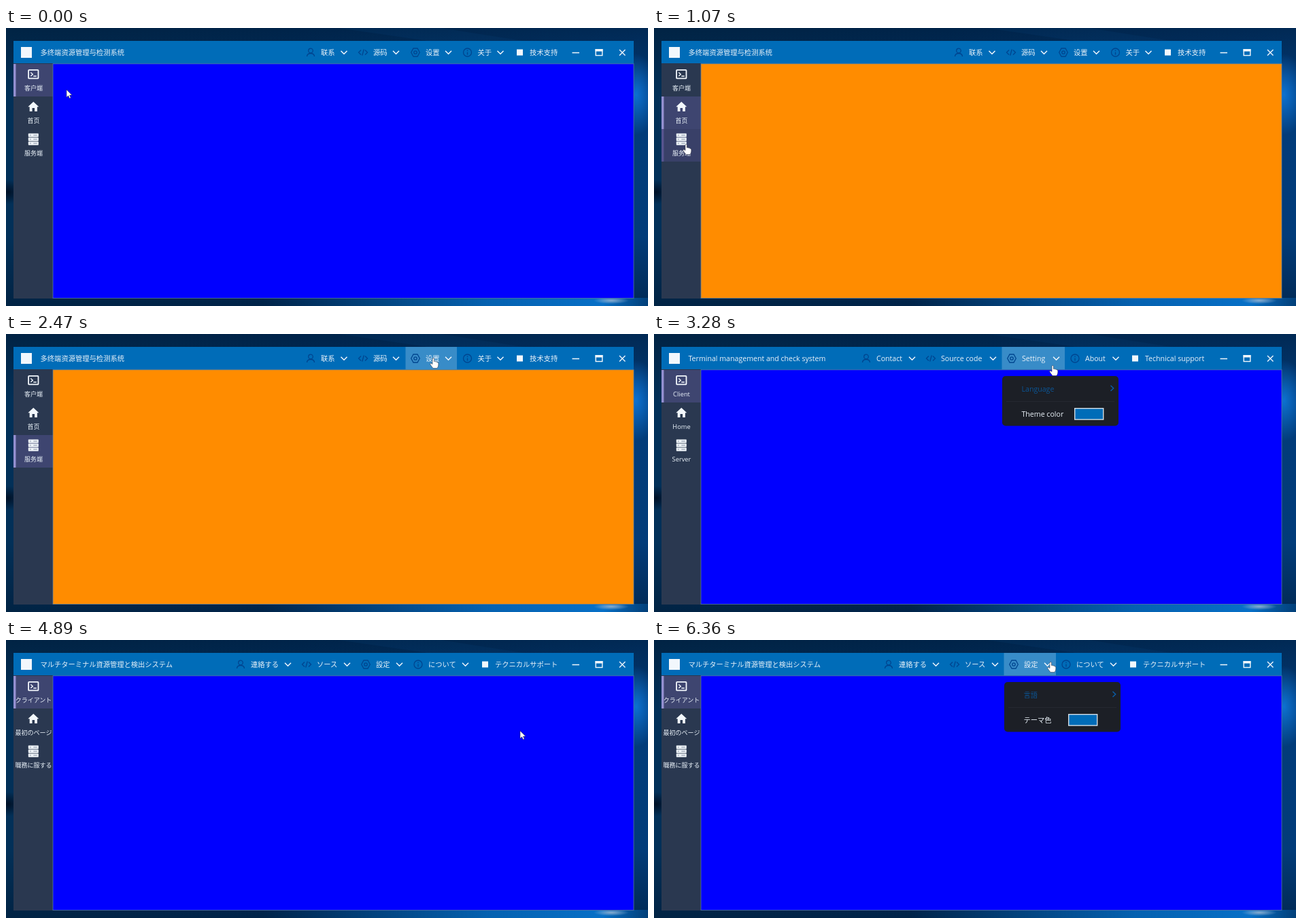
Recreate the animation shown at these times as an HTML page. Size 944 px wide and 410 px high, loop 6.49 s.

```html
<!DOCTYPE html>
<html lang="en">
<head>
<meta charset="utf-8">
<title>Desktop menu demo</title>
<style>
html, body { margin: 0; width: 100%; height: 100%; overflow: hidden; background: #02284f; }
svg { display: block; width: 944px; height: 410px; }
.zh { font-family: "Noto Sans CJK SC", "Noto Sans CJK", sans-serif; --size: 10.3px; }
.ja { font-family: "Noto Sans CJK JP", "Noto Sans CJK", sans-serif; --size: 10.25px; }
.en { font-family: "Open Sans", "Noto Sans", sans-serif; --size: 10.6px; }
text { font-size: var(--size); font-weight: 500; fill: #eaf2f9; white-space: pre; }
.side { font-size: 9px; text-anchor: middle; }
.en .side { font-size: 9.3px; }
.dim { fill: #0b5595; }
.line { fill: none; stroke: #f2f7fc; stroke-width: 1.4; }
.dark { fill: none; stroke: #00458f; stroke-width: 1.3; }
</style>
</head>
<body>
<svg viewBox="0 0 944 410">
  <defs>
    <linearGradient id="sky">
      <stop offset="0" stop-color="#023058"/>
      <stop offset=".45" stop-color="#003062"/>
      <stop offset="1" stop-color="#023c7a"/>
    </linearGradient>
    <linearGradient id="shade" x2="0" y2="1">
      <stop offset="0" stop-color="#001730" stop-opacity=".5"/>
      <stop offset=".25" stop-color="#001730" stop-opacity="0"/>
      <stop offset=".75" stop-color="#001730" stop-opacity="0"/>
      <stop offset="1" stop-color="#001730" stop-opacity=".5"/>
    </linearGradient>
    <linearGradient id="floor">
      <stop offset=".4" stop-color="#0670c8" stop-opacity="0"/>
      <stop offset=".75" stop-color="#0670c8" stop-opacity=".8"/>
      <stop offset=".93" stop-color="#0878d4" stop-opacity=".9"/>
      <stop offset="1" stop-color="#0670c8" stop-opacity=".3"/>
    </linearGradient>
    <radialGradient id="glow">
      <stop offset="0" stop-color="#0f7be0" stop-opacity=".85"/>
      <stop offset="1" stop-color="#0f7be0" stop-opacity="0"/>
    </radialGradient>
    <radialGradient id="night">
      <stop offset="0" stop-color="#000d20" stop-opacity=".9"/>
      <stop offset="1" stop-color="#000d20" stop-opacity="0"/>
    </radialGradient>
    <radialGradient id="mist">
      <stop offset="0" stop-color="#a9bfd6" stop-opacity=".8"/>
      <stop offset="1" stop-color="#a9bfd6" stop-opacity="0"/>
    </radialGradient>
  </defs>
  <rect width="944" height="410" fill="url(#sky)"/>
  <path d="M490 0 640 0 760 19H620Z" fill="#0a58a4" opacity=".25"/>
  <rect width="944" height="410" fill="url(#shade)"/>
  <rect y="398" width="944" height="12" fill="url(#floor)"/>
  <ellipse cx="926" cy="98" rx="34" ry="60" fill="url(#glow)"/>
  <ellipse cx="3" cy="242" rx="22" ry="18" fill="url(#night)"/>
  <ellipse cx="890" cy="402" rx="26" ry="5" fill="url(#mist)"/>
  <g id="app"></g>
</svg>
<script>
const LOOP = 6490, THEME = '#006cb8';
const PAGES = ['#00f', '#f00', '#ff8c00'];
const LANGUAGES = ['中文', 'English', '日本語'];

// x: menu text positions, chev: chevron centres
const PACKS = {
  zh: {
    title: '多终端资源管理与检测系统', side: ['客户端', '首页', '服务端'],
    menu: ['联系', '源码', '设置', '关于'], x: [463, 540, 617, 693.5], chev: [497, 573.5, 650.5, 727],
    help: '技术支持', helpX: 770, lang: '语言', color: '主题颜色', swatch: 94
  },
  en: {
    title: 'Terminal management and check system', side: ['Client', 'Home', 'Server'],
    menu: ['Contact', 'Source code', 'Setting', 'About'], x: [327, 422, 541, 634], chev: [379.5, 498.5, 591.5, 679],
    help: 'Technical support', helpX: 722, lang: 'Language', color: 'Theme color', swatch: 106
  },
  ja: {
    title: 'マルチターミナル資源管理と検出システム', side: ['クライアント', '最初のページ', '職務に服する'],
    menu: ['連絡する', 'ソース', '設定', 'について'], x: [360, 457, 544, 621], chev: [414.5, 501.5, 578.5, 675.5],
    help: 'テクニカルサポート', helpX: 719, lang: '言語', color: 'テーマ色', swatch: 94
  }
};

// each step changes only the listed properties
const STEPS = [
  [0, { lang: 'zh', page: 0, active: 0, over: -1, x: 89, y: 91, hand: 0, ripple: 0, hot: 0, menu: 0, sub: 0, pick: -1 }],
  [270, { x: 60, y: 112, hand: 1, over: 1 }],
  [470, { x: 45, y: 131 }],
  [670, { page: 1, ripple: 1 }],
  [870, { active: 1, over: -1, ripple: 0, x: 46, y: 142 }],
  [1070, { page: 2, over: 2, x: 47, y: 172 }],
  [1270, { active: 2, over: -1 }],
  [1470, { x: 100, y: 190, hand: 0 }],
  [1670, { x: 240, y: 222 }],
  [1870, { x: 400, y: 252 }],
  [2070, { x: 524, y: 265 }],
  [2270, { x: -50 }],
  [2470, { x: 628, y: 36, hand: 1, hot: 1 }],
  [2670, { x: 630, y: 76, menu: 1 }],
  [2870, { x: 790, y: 112, sub: 1, pick: 1 }],
  [3080, { lang: 'en', page: 0, active: 0, hot: 0, menu: 0, sub: 0, x: 660, y: 80, hand: 0 }],
  [3280, { x: 586, y: 47, hand: 1, hot: 1, menu: 1 }],
  [3490, { x: 600, y: 76 }],
  [3690, { x: 655, y: 78, sub: 1, pick: -1 }],
  [3890, { x: 710, y: 84, pick: 0 }],
  [4090, { x: 745, y: 110, pick: 1 }],
  [4290, { x: 756, y: 140, pick: 2 }],
  [4690, { lang: 'ja', hot: 0, menu: 0, sub: 0, y: 134, hand: 0 }],
  [5290, { x: 738, y: 122 }],
  [5490, { x: 704, y: 104 }],
  [5690, { x: 666, y: 86 }],
  [5890, { x: 630, y: 70 }],
  [6090, { x: 600, y: 58 }],
  [6360, { x: 583, y: 33, hand: 1, hot: 1, menu: 1 }]
];

const rect = (x, y, w, h, fill, more = '') =>
  `<rect x="${x}" y="${y}" width="${w}" height="${h}" fill="${fill}" ${more}/>`;
const text = (x, y, s, cls = '') => `<text x="${x}" y="${y}" class="${cls}">${s}</text>`;
const path = (d, cls, more = '') => `<path d="${d}" class="${cls}" ${more}/>`;
const at = (x, y, body) => `<g transform="translate(${x} ${y})">${body}</g>`;

const ICONS = [
  '<circle cy="-2.5" r="3.3" class="dark"/>' + path('M-5.5 6C-5 0 5 0 5.5 6', 'dark'),
  path('M-3-3.5-6.5 0-3 3.5M3-3.5 6.5 0 3 3.5M1.3-4.5-1.3 4.5', 'dark'),
  path('M-3-6H3L6.3 0 3 6H-3L-6.3 0Z', 'dark') + '<circle r="2.2" class="dark"/>',
  '<circle r="6" class="dark"/>' + path('M0-3.5V-2M0-.5V3.5', 'dark')
];
const SIDE_ICONS = [
  '<rect x="-7.2" y="-6.2" width="14.4" height="12.6" rx="1" class="line" style="stroke-width:1.8"/>' +
    path('M-4-2.5-1 .2-4 3M0 3H4.5', 'line'),
  path('M0-7.2 8 .2H5.6V7H1.8V2H-1.8V7H-5.6V.2H-8Z', '', 'fill="#f2f7fc"'),
  [-8.5, -2.5, 3.5].map(y => rect(-7.5, y, 15, 5.2, '#eef3f8', 'rx=".8"') +
    path(`M-5.5 ${y + 2.6}H-3.5M0 ${y + 2.6}H5.5`, '', 'stroke="#8793a5"')).join('')
];
const EDGE = 'fill="#fff" stroke="#223" stroke-width=".5"';
const ARROW = path('M0 0V11.2L2.6 8.8 4.3 12.8 6.2 12 4.5 8.1H8Z', '', EDGE);
const HAND = path('M-1 0Q.2-1.2 1.4 0V4.5Q3 3.8 3.6 5 5.2 4.4 5.8 5.7 7.6 5.4 7.8 7.2V10Q7.5 13 5.6 14.5H0Q-2.5 11.5-4.5 8.2-3.2 6.4-1 8.5Z', '', EDGE);

function sidebar(s, p) {
  let out = rect(11, 52, 58, 347, '#2a3850');
  p.side.forEach((label, i) => {
    const top = 53 + 48 * i, on = s.active === i;
    if (on || s.over === i) {
      out += rect(11, top, 58, 48, on ? '#3e4570' : '#394068');
      out += rect(11, top, 3.5, 48, on ? '#938fd0' : '#57548f');
    }
    out += at(40.3, top + 15, SIDE_ICONS[i]) + text(40.5, top + 38.5, label, 'side');
  });
  if (s.ripple) out += '<circle cx="45" cy="126" r="12" fill="#8c8fa8" opacity=".4"/>';
  return out;
}

function titleBar(s, p) {
  let out = rect(11, 19, 912, 34, THEME);
  if (s.hot) {
    const left = p.x[2] - 29.5;
    out += rect(left, 19, p.chev[2] + 12.5 - left, 33.5, '#fff', 'opacity=".22"');
  }
  out += rect(22, 28, 16, 16, '#f2f7fc') + text(50.5, 40.2, p.title);
  p.menu.forEach((label, i) => {
    out += at(p.x[i] - 15, 36, ICONS[i]) + text(p.x[i], 40.2, label);
    out += at(p.chev[i], 36, path('M-4.5-2.3 0 2.3 4.5-2.3', 'line'));
  });
  out += rect(p.helpX - 19, 31.5, 9, 9, '#f2f7fc') + text(p.helpX, 40.2, p.help);
  out += path('M832.5 36.5H843M902 32 910.5 40.5M910.5 32 902 40.5', 'line');
  out += '<rect x="867.2" y="31.7" width="9.6" height="8.8" class="line"/>' + rect(866.5, 31, 11, 3.5, '#f2f7fc');
  return out;
}

function popup(s, p) {
  const x = p.x[2] - 29;
  let out = rect(x, 62, 171, 73.5, '#1c1f26', 'rx="5"');
  out += rect(x + 6, 99, 159, .7, '#2a2d35');
  out += text(x + 28.5, 84.7, p.lang, 'dim');
  out += at(x + 161.5, 80, path('M-2-4 2.2 0-2 4', 'line', 'style="stroke:#0b5ea8"'));
  out += text(x + 28.5, 121.7, p.color);
  out += rect(x + p.swatch + .7, 109.7, 42, 16.4, THEME, 'stroke="#d5dce3" stroke-width="1.4"');
  if (!s.sub) return out;
  out += rect(x + 173, 62, 112, 111, '#1c1f26', 'rx="5"');
  LANGUAGES.forEach((name, i) => {
    out += text(x + 199, 84.7 + 37 * i, name, s.pick === i ? 'dim' : '');
  });
  return out;
}

function draw(s) {
  const p = PACKS[s.lang];
  return `<g class="${s.lang}">` + titleBar(s, p) + sidebar(s, p) +
    rect(69, 52.8, 854, 345.7, PAGES[s.page], 'stroke="#5b7f9e" stroke-opacity=".75"') +
    (s.menu ? popup(s, p) : '') + at(s.x, s.y, s.hand ? HAND : ARROW) + '</g>';
}

let state = {};
const scenes = STEPS.map(([time, change]) => {
  state = { ...state, ...change };
  return { time, svg: draw(state) };
});

const app = document.getElementById('app');
let shown = -1;
function tick() {
  const t = performance.now() % LOOP;
  const next = scenes.findLastIndex(scene => scene.time <= t);
  if (next !== shown) app.innerHTML = scenes[shown = next].svg;
  requestAnimationFrame(tick);
}
tick();
</script>
</body>
</html>
```
